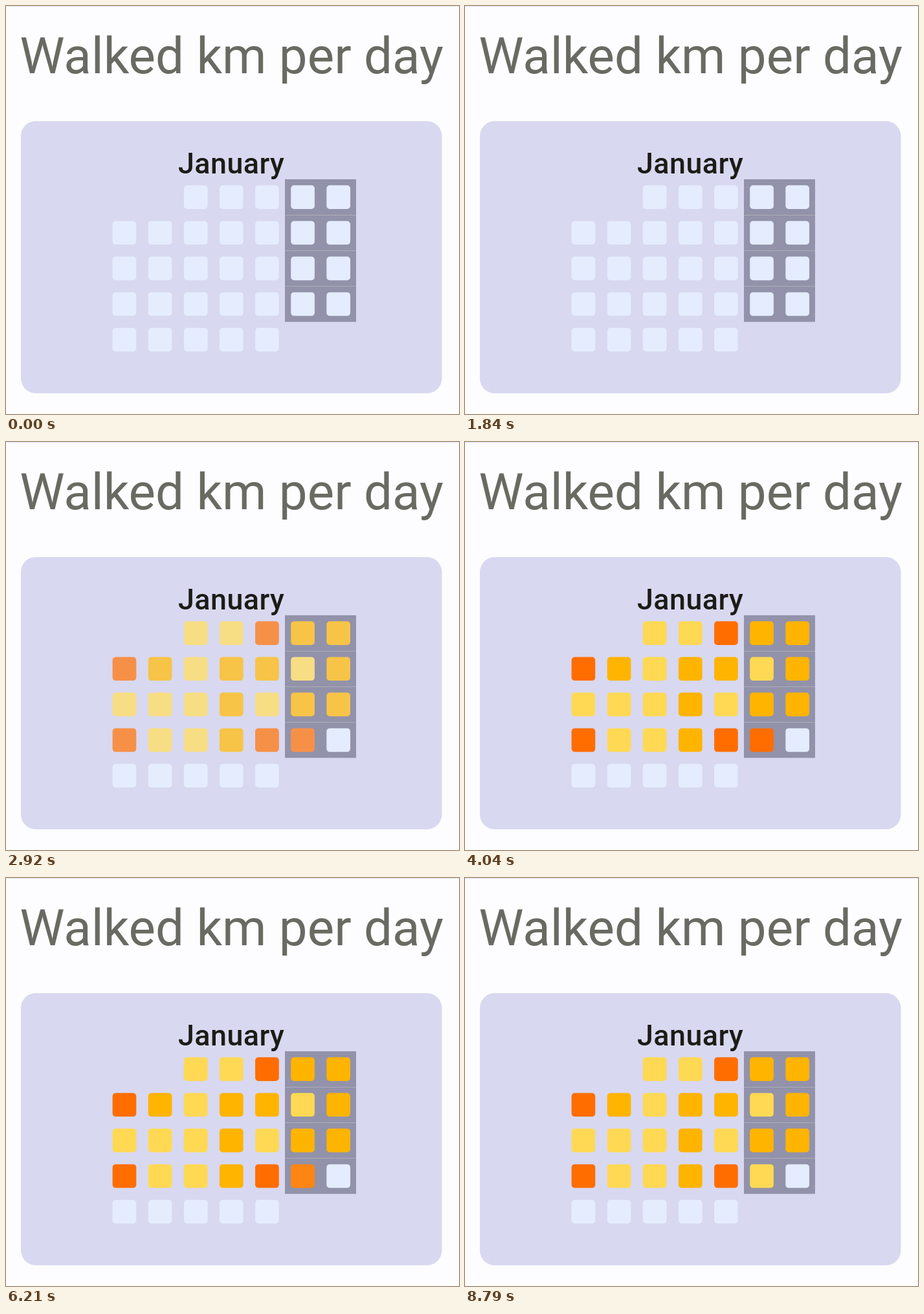
An HTML page that plays this animation: 700 px wide and 631 px high, repeating every 8830 ms.

```html
<!DOCTYPE html>
<html lang="en">
<head>
<meta charset="utf-8">
<title>Walked km per day</title>
<style>
  html, body { margin: 0; height: 100%; overflow: hidden; background: #fdfdff; }
  svg { display: block; font-family: Roboto, sans-serif; text-anchor: middle; }
</style>
</head>
<body>
<svg width="700" height="631" viewBox="0 0 700 631">
  <rect width="700" height="1" fill="#dfe2fb"/>
  <text x="348.6" y="103.8" font-size="78.1" fill="#696a62">Walked km per day</text>
  <rect x="23" y="178" width="650.5" height="421" rx="23" fill="#d8d8f0"/>
  <text x="348.2" y="259" font-size="44.8" font-weight="500" letter-spacing=".45" fill="#1c1c16">January</text>
  <rect x="431" y="268" width="110" height="220.5" fill="#9292aa"/>
  <path d="M431 323.5h110m-110 55h110m-110 55h110" stroke="#adadb8"/>
  <g id="days"></g>
</svg>
<script>
const LOOP = 8830, PITCH = 55.12;
const EMPTY = [228, 236, 254];
const LEVELS = { y: [255, 217, 84], a: [255, 180, 0], o: [255, 109, 0], '-': EMPTY };
const WEEKS = ['  yyoaa', 'oayaaya', 'yyyayaa', 'oyyaoo-', '-----  '];
const days = document.getElementById('days');
const cells = [];

WEEKS.forEach((week, row) => [...week].forEach((key, col) => {
  if (key === ' ') return;
  const rect = document.createElementNS('http://www.w3.org/2000/svg', 'rect');
  const attrs = { x: 164.6 + col * PITCH, y: 277.3 + row * PITCH, width: 36.7, height: 36.7, rx: 5 };
  for (const name in attrs) rect.setAttribute(name, attrs[name]);
  days.append(rect);
  cells.push({ rect, color: LEVELS[key], edited: row === 3 && col === 5 });
}));

const ease = (t, start, length) => {
  const p = Math.min(1, Math.max(0, (t - start) / length));
  return p * p * (3 - 2 * p);
};
const mix = (a, b, p) => a.map((v, i) => v + (b[i] - v) * p);

function draw(now) {
  const t = now % LOOP;
  const fill = ease(t, 2530, 600);
  const edit = ease(t, 6030, 600);
  for (const { rect, color, edited } of cells) {
    const goal = edited ? mix(color, LEVELS.y, edit) : color;
    rect.setAttribute('fill', `rgb(${mix(EMPTY, goal, fill).map(Math.round)})`);
  }
  requestAnimationFrame(draw);
}
draw(performance.now());
</script>
</body>
</html>
```
